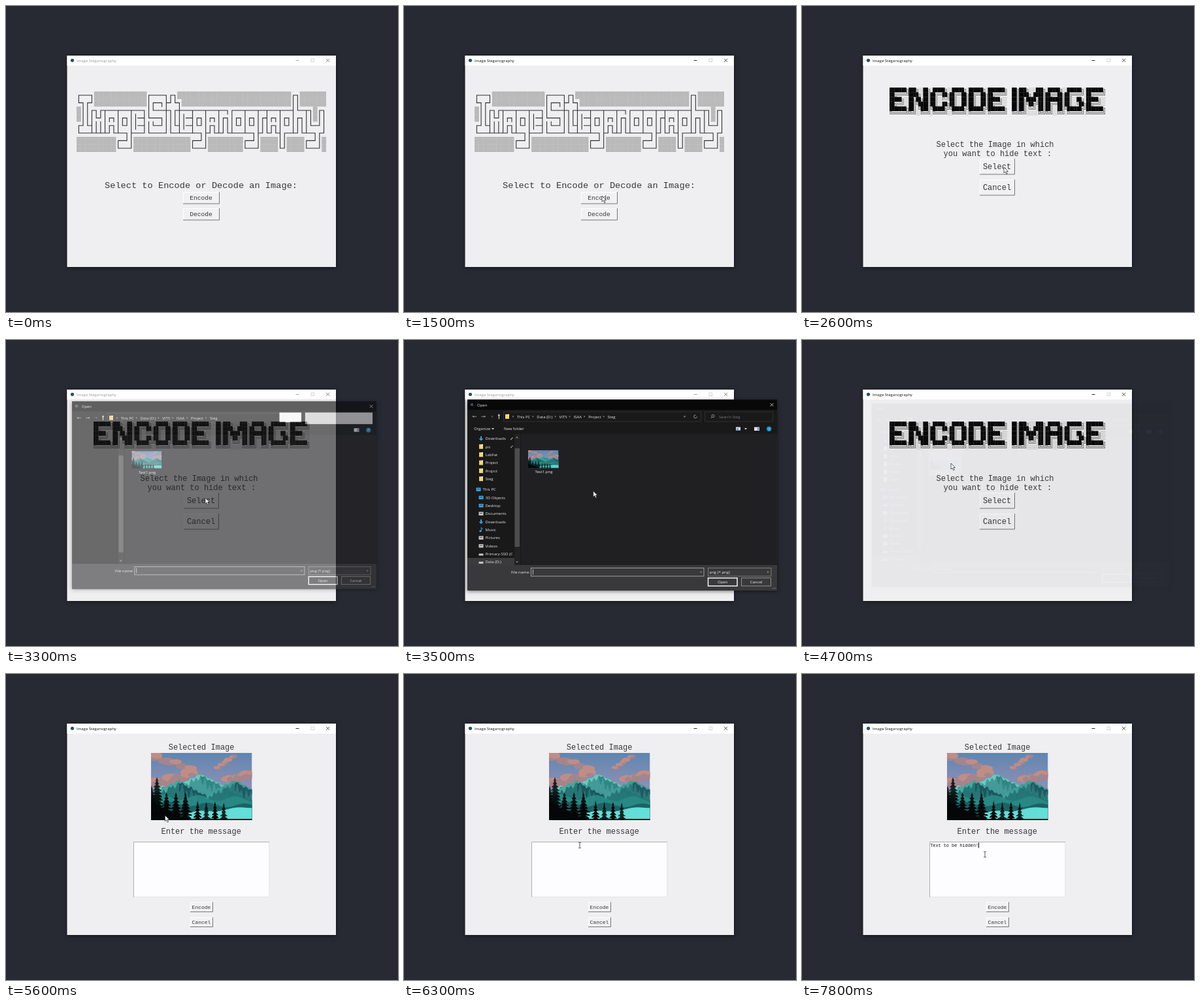
An HTML page with a canvas that plays this animation: 600 by 469 pixels, repeating every 8000 ms.

```html
<!DOCTYPE html>
<html lang="en">
<head>
<meta charset="utf-8">
<title>Image Steganography</title>
<style>
html, body { margin: 0; width: 100%; height: 100%; overflow: hidden; background: #282a33; }
canvas { display: block; width: 600px; height: 469px; }
</style>
</head>
<body>
<canvas id="stage"></canvas>
<script>
const W = 600, H = 469, LOOP = 8000, STEP = 100;
const MONO = '"Liberation Mono", "Courier New", monospace';
const SANS = '"Open Sans", "Noto Sans", sans-serif';
const PAPER = '#efeef0', INK = '#383838';
const canvas = document.getElementById('stage');
const dpr = window.devicePixelRatio || 1;
canvas.width = W * dpr;
canvas.height = H * dpr;
const c = canvas.getContext('2d');

// ---- helpers ----
const clamp = v => Math.max(0, Math.min(1, v));
const ease = k => k * k * (3 - 2 * k);
const rnd = i => Math.abs(Math.sin(i * 127.1 + 11.7) * 43758.5) % 1;

function rect(x, y, w, h, color) {
  c.fillStyle = color;
  c.fillRect(x, y, w, h);
}

function frame(x, y, w, h, color, weight = 0.8) {
  c.strokeStyle = color;
  c.lineWidth = weight;
  c.strokeRect(x, y, w, h);
}

function dot(x, y, r, color, ry = r) {
  c.fillStyle = color;
  c.beginPath();
  c.ellipse(x, y, r, ry, 0, 0, 7);
  c.fill();
}

function trace(pts) {
  c.beginPath();
  for (let i = 0; i < pts.length; i += 2) c.lineTo(pts[i], pts[i + 1]);
}

function poly(color, ...pts) {
  trace(pts);
  c.fillStyle = color;
  c.fill();
}

function line(color, weight, ...pts) {
  trace(pts);
  c.strokeStyle = color;
  c.lineWidth = weight;
  c.stroke();
}

function text(str, x, y, size, color = INK, family = MONO, align = 'left') {
  c.font = size + 'px ' + family;
  c.fillStyle = color;
  c.textAlign = align;
  c.fillText(str, x, y);
}

const label = (str, x, y, color = '#e8e8e8', align) => text(str, x, y, 6, color, SANS, align);

function chevron(x, y, dx, dy, color = '#aaa') {
  line(color, 0.8, x - dx - dy, y - dy - dx, x + dx, y + dy, x - dx + dy, y - dy + dx);
}

function cross(x, y, r, color) {
  line(color, 0.8, x - r, y - r, x + r, y + r);
  line(color, 0.8, x + r, y - r, x - r, y + r);
}

// ---- character banners ----
// Digits stand for runs of shade cells.
const unpack = rows => rows.map(r => r.replace(/\d+/g, n => '░'.repeat(n)));

const HOME = unpack([
  '┏━━┓12┏━━━┓┏┓26┏┓6',
  '┗┓┏┛12┃┏━┓┣┛┗┓25┃┃6',
  '1┃┃┏┓┏┳━━┳━━┳━━┓┃┗━━╋┓┏╋━━┳━━┳━━┳━┓┏━━┳━━┳━┳━━┳━━┫┗━┳┓1┏┓',
  '1┃┃┃┗┛┃┏┓┃┏┓┃┃━┫┗━━┓┃┃┃┃┃━┫┏┓┃┏┓┃┏┓┃┏┓┃┏┓┃┏┫┏┓┃┏┓┃┏┓┃┃1┃┃',
  '┏┛┗┫┃┃┃┏┓┃┗┛┃┃━┫┃┗━┛┃┃┗┫┃━┫┗┛┃┏┓┃┃┃┃┗┛┃┗┛┃┃┃┏┓┃┗┛┃┃┃┃┗━┛┃',
  '┗━━┻┻┻┻┛┗┻━┓┣━━┛┗━━━┛┗━┻━━┻━┓┣┛┗┻┛┗┻━━┻━┓┣┛┗┛┗┫┏━┻┛┗┻━┓┏┛',
  '9┏━┛┃13┏━┛┃8┏━┛┃4┃┃4┏━┛┃1',
  '9┗━━┛13┗━━┛8┗━━┛4┗┛4┗━━┛1'
]);

const ENCODE = unpack([
  '███████╗███╗2██╗1█████╗2█████╗1██████╗1███████╗  ██╗███╗3███╗1█████╗2██████╗1███████╗',
  '██╔════╝████╗1██║██╔══██╗██╔══██╗██╔══██╗██╔════╝  ██║████╗1████║██╔══██╗██╔════╝1██╔════╝',
  '█████╗2██╔██╗██║██║2╚═╝██║2██║██║2██║█████╗2  ██║██╔████╔██║███████║██║2██╗1█████╗2',
  '██╔══╝2██║╚████║██║2██╗██║2██║██║2██║██╔══╝2  ██║██║╚██╔╝██║██╔══██║██║2╚██╗██╔══╝2',
  '███████╗██║1╚███║╚█████╔╝╚█████╔╝██████╔╝███████╗  ██║██║1╚═╝1██║██║2██║╚██████╔╝███████╗',
  '╚══════╝╚═╝2╚══╝1╚════╝2╚════╝1╚═════╝1╚══════╝  ╚═╝╚═╝5╚═╝╚═╝2╚═╝1╚═════╝1╚══════╝'
]);

// A glyph has an arm towards each side whose list contains it.
const UP = '┃┗┛┣┫┻╋║╚╝', RIGHT = '━┏┗┣┳┻╋═╔╚', DOWN = '┃┏┓┣┫┳╋║╔╗', LEFT = '━┓┛┫┳┻╋═╗╝';

function eachCell(rows, x, y, cw, ch, fn) {
  rows.forEach((row, j) => [...row].forEach((g, i) => fn(g, x + i * cw, y + j * ch)));
}

function arms(rows, x, y, cw, ch, color, weight) {
  c.beginPath();
  eachCell(rows, x, y, cw, ch, (g, px, py) => {
    const mx = px + cw / 2, my = py + ch / 2;
    const arm = (side, ex, ey) => {
      if (side.includes(g)) { c.moveTo(mx, my); c.lineTo(ex, ey); }
    };
    arm(UP, mx, py);
    arm(RIGHT, px + cw, my);
    arm(DOWN, mx, py + ch);
    arm(LEFT, px, my);
  });
  c.strokeStyle = color;
  c.lineWidth = weight;
  c.lineCap = 'square';
  c.stroke();
  c.lineCap = 'butt';
}

function shade(rows, x, y, cw, ch, lines, color) {
  const pitch = ch / lines;
  eachCell(rows, x, y, cw, ch, (g, px, py) => {
    if (g !== '░') return;
    for (let k = 0; k < lines; k++) rect(px, py + k * pitch + 0.6, cw + 0.1, pitch * 0.4, color);
  });
}

function homeBanner() {
  const grid = [HOME, 108, 131, 6.7, 11.6];
  eachCell(...grid, (g, x, y) => { if (g === '░') rect(x, y, 6.8, 11.6, '#cacaca'); });
  shade(...grid, 5, '#a2a2a2');
  arms(...grid, '#333', 1.1);
}

function encodeBanner() {
  const grid = [ENCODE, 134, 125, 3.67, 7.2];
  shade(...grid, 3, '#c4c4c4');
  arms(...grid, '#4a4a4a', 2.7);
  arms(...grid, PAPER, 1.3);
  eachCell(...grid, (g, x, y) => { if (g === '█') rect(x, y, 3.87, 7.4, '#060606'); });
}

// ---- landscape, 154 x 102 units ----
function cloud(x0, y0, x1, y1, size) {
  for (let i = 0; i < 16; i++) {
    const k = i / 15, lift = rnd(i + x0), r = size * (0.5 + rnd(i + y1));
    const x = x0 + (x1 - x0) * k, y = y0 + (y1 - y0) * k + (lift - 0.5) * size;
    dot(x, y, r, lift < 0.45 ? '#c08d85' : '#a5858c', r * 0.5);
  }
}

// Each column follows the nearest peak, lit to the left and shaded to the right.
function mountains(body, lit, dark, ...peaks) {
  for (let x = 0; x < 154; x++) {
    const slopes = peaks.map(([px, py]) => py + 0.5 * Math.abs(x - px));
    const top = Math.min(...slopes), side = x - peaks[slopes.indexOf(top)][0];
    const y = top + 1.5 * Math.sin(x * 0.6) * rnd(x >> 2);
    rect(x, y, 1.3, 102 - y, body);
    const depth = 6 + 3 * Math.sin(x * 0.9) + 2 * Math.sin(x * 0.37);
    rect(x, y, 1.3, depth * (side < 0 ? 0.8 : 0.35), lit);
    if (side > 0) rect(x, y + depth * 0.35, 1.3, depth * 1.5, dark);
  }
}

function hill(color, from, y, slope, wave = 0) {
  for (let x = from; x < 154; x++) {
    const top = y + slope * (x - from) + wave * Math.sin(x * 0.11 + y);
    rect(x, top, 1.3, 102 - top, color);
  }
}

function tree(x, top, half) {
  for (let y = top; y < 101; y++) {
    const k = Math.min(1, (y - top + 2) / 32);
    const w = half * k * (0.45 + 0.55 * ((y - top) % 5) / 4) * (0.8 + 0.4 * rnd(x + y));
    rect(x - w, y, 2 * w, 1.2, '#050808');
  }
}

function paintScene() {
  const sky = c.createLinearGradient(0, 0, 0, 50);
  sky.addColorStop(0, '#5f86b0');
  sky.addColorStop(1, '#8c8fb5');
  rect(0, 0, 154, 102, sky);
  cloud(4, 4, 62, 24, 7);
  cloud(126, 4, 100, 24, 4);
  cloud(6, 44, 62, 33, 10);
  cloud(116, 42, 152, 31, 8);
  mountains('#3c9c95', '#78d2c6', '#2b827f', [75, 32], [16, 50], [104, 47]);
  mountains('#237374', '#4caea5', '#1a525c', [42, 42], [127, 42]);
  hill('#2a8b85', 0, 66, 0.03, 4);
  hill('#1b5e62', 0, 77, 0.02, 3);
  hill('#6deee6', 56, 91, -0.09, 1.5);
  hill('#050808', 0, 76, 0.45);
  hill('#050808', 0, 100, 0);
  for (let i = 0; i < 4; i++) {
    tree(9 + i * 14.5, i ? 60 : 37, 9);
    tree(71 + i * 13.3, 72 + rnd(i) * 4, 7);
  }
  tree(1, 50, 8);
}

function scene(x, y, w, h) {
  c.save();
  c.translate(x, y);
  c.scale(w / 154, h / 102);
  c.beginPath();
  c.rect(0, 0, 154, 102);
  c.clip();
  paintScene();
  c.restore();
}

// ---- app window ----
function panel(x, y, w, h, color) {
  c.save();
  c.shadowColor = 'rgba(0,0,0,.55)';
  c.shadowBlur = 6 * dpr;
  c.shadowOffsetY = dpr;
  rect(x, y, w, h, color);
  c.restore();
}

function appWindow(active) {
  const ink = active ? '#111' : '#999';
  panel(93.5, 76, 411.5, 324, PAPER);
  rect(93.5, 76, 411.5, 15.3, '#fff');
  dot(101.5, 83.3, 2.6, '#2d4f68');
  label('Image Steganography', 108, 85.6, ink);
  line(ink, 0.9, 443.5, 83.5, 448.5, 83.5);
  frame(467, 81, 4.6, 4.6, '#ccc');
  cross(492.5, 83.3, 2.6, active ? '#222' : '#666');
}

function button(str, x, y, w, h, size) {
  rect(x, y, w, h, '#f1f0f2');
  line('#fff', 1, x + 0.5, y + h, x + 0.5, y + 0.5, x + w, y + 0.5);
  line('#777', 1, x, y + h - 0.5, x + w - 0.5, y + h - 0.5, x + w - 0.5, y);
  text(str, x + w / 2 - 0.5, y + h / 2 + size * 0.32, size, INK, MONO, 'center');
}

function homeScreen() {
  homeBanner();
  text('Select to Encode or Decode an Image:', 151, 279.3, 13.67);
  button('Encode', 271, 285, 56, 18.5, 9.6);
  button('Decode', 271, 310, 56, 18.5, 9.6);
}

function encodeScreen() {
  encodeBanner();
  text('Select the Image in which', 205.5, 216, 12);
  text('you want to hide text :', 216.5, 230, 12);
  button('Select', 272, 234, 54, 24.5, 12);
  button('Cancel', 272, 266, 54, 24.5, 12);
}

function messageScreen(t) {
  text('Selected Image', 248.7, 115.5, 12);
  scene(222, 121, 154.5, 103);
  text('Enter the message', 237.5, 245, 12);
  rect(195, 257, 208, 85, '#fdfcfe');
  line('#a8a8a8', 0.9, 195.5, 342, 195.5, 257.5, 403, 257.5);
  line('#dcdcdc', 0.7, 196, 341.7, 402.7, 341.7, 402.7, 258);
  button('Encode', 282, 349.5, 35, 15.5, 8);
  button('Cancel', 282, 373, 35, 15, 8);
  if (t < 6400) return;
  const msg = 'Text to be hidden!', size = 6.85;
  const n = Math.floor(msg.length * clamp((t - 6500) / 1150));
  text(msg.slice(0, n), 196.2, 265, size, '#111');
  rect(196 + n * size * 0.6, 258.5, 1, 8, '#000');
}

// ---- file dialog ----
const FOLDER = '#f4d37a', BLUE = '#35a3dd', GREY = '#c8c8c8';
const CRUMBS = ['This PC', 'Data (D:)', 'VIT5', 'ISAA', 'Project', 'Steg'];
const PINNED = ['Downloads', 'pic', 'LabFat', 'Project', 'Projrct', 'Steg'];
const DRIVES = [
  'This PC', '3D Objects', 'Desktop', 'Documents', 'Downloads', 'Music', 'Pictures', 'Videos',
  'Primary-SSD (C', 'Data (D:)'
];

function icon(str, x, y) {
  if (str === 'Downloads') {
    rect(x - 1, y - 3.5, 2, 4, BLUE);
    poly(BLUE, x - 3.5, y, x + 3.5, y, x, y + 3.5);
  } else if (str === 'Music') {
    dot(x - 1, y + 2, 1.7, BLUE);
    line(BLUE, 1, x + 0.3, y + 2, x + 0.3, y - 3.5, x + 2.5, y - 1);
  } else if (/SSD|D:/.test(str)) {
    rect(x - 3.5, y - 0.5, 7, 3, GREY);
  } else if (DRIVES.includes(str)) {
    rect(x - 3.5, y - 2.7, 7, 5.4, /PC|3D|Desk/.test(str) ? BLUE : GREY);
    rect(x - 2, y - 1, 4, 1, '#445');
  } else {
    rect(x - 3, y - 3.5, 6, 7, FOLDER);
    rect(x + 1, y - 3.5, 2, 2, '#fff0b8');
  }
}

function sidebar() {
  rect(97, 334, 72, 11, '#3b3b3b');
  [...PINNED, ...DRIVES].forEach((str, i) => {
    const y = 151 + i * 12.35 + (i < PINNED.length ? 0 : 4);
    const x = str === 'This PC' ? 114 : 118;
    icon(str, x, y);
    label(str, x + 6.5, y + 2.2);
    if (i < 2) line('#aaa', 1.1, 163, y + 2, 166.5, y - 1.5);
  });
}

function addressBar() {
  for (const dir of [-1, 1]) {
    const x = 114.7 + dir * 6.7;
    line('#999', 0.9, x - 3, 117.3, x + 3, 117.3);
    chevron(x + 2 * dir, 117.3, 1.2 * dir, 0, '#999');
  }
  chevron(135, 117.3, 0, 1, '#777');
  line('#eee', 1, 145.3, 121, 145.3, 114.5);
  chevron(145.3, 115, 0, -1.3, '#eee');
  frame(152.5, 110, 302, 15, '#363636');
  icon('', 158, 117.3);
  let x = 173;
  for (const str of CRUMBS) {
    chevron(x - 6, 117.3, 0.8, 0);
    label(str, x, 119.5);
    x += c.measureText(str).width + 10;
  }
  chevron(429.5, 117.3, 0, 1.2);
  frame(460.5, 110, 104, 15, '#363636');
}

function toolbar() {
  c.strokeStyle = '#aaa';
  c.lineWidth = 0.8;
  c.beginPath();
  c.arc(446, 117.3, 2.4, 0, 5);
  c.moveTo(475, 116.5);
  c.arc(473, 116.5, 2, 0, 7);
  c.stroke();
  line('#aaa', 0.8, 471.5, 118, 469.5, 120);
  label('Search Steg', 482, 119.5, '#777');
  label('Organize', 107, 138.4);
  label('New folder', 153, 138.4);
  for (const x of [136, 523]) poly('#ddd', x - 2, 135, x + 2, 135, x, 137.5);
  rect(508, 133.5, 7, 5, '#d7e6f2');
  rect(509, 135.5, 3, 2, '#3c80ba');
}

function footer(picked) {
  label('File name:', 164, 358);
  frame(194.5, 349.5, 264.5, 12.5, '#b8b8b8');
  if (picked) label('Test1.png', 197, 358);
  else rect(197, 351.5, 0.8, 8, '#ddd');
  frame(465.5, 349.5, 96.5, 12.5, '#8a8a8a');
  label('png (*.png)', 467.5, 358);
  for (const x of [454.5, 557]) chevron(x, 355.7, 0, 1.1);
  frame(465.5, 364.8, 44.5, 12.2, '#fff', 1.4);
  label('Open', 487.7, 373.2, '#eee', 'center');
  frame(516.5, 364.8, 45, 12.2, '#a5a5a5');
  label('Cancel', 539, 373.2, '#eee', 'center');
  for (let i = 0; i < 3; i++) rect(568 - i * 2, 380, 1, 1, '#999');
}

function dialog(loading, closing, picked) {
  panel(97, 91.5, 474, 292.5, '#191919');
  rect(97, 91.5, 474, 15.5, '#080808');
  rect(179, 144, 392, 201, '#202022');
  rect(97, 345, 474, 39, '#39383b');
  if (!closing) {
    dot(104, 99, 2.3, '#2d4f68');
    cross(563, 99.3, 2.5, '#ddd');
  }
  label('Open', closing ? 102 : 112, 101.5);
  addressBar();
  if (loading) {
    rect(420, 109, 34, 15, '#fff');
    rect(460, 109, 105, 18, '#d4d4d4');
  } else {
    toolbar();
    sidebar();
  }
  rect(536, 133.5, 8, 5.5, '#e2e2e2');
  rect(541, 134.5, 2.3, 3.7, '#4a94cc');
  dot(558.7, 136.3, 3.7, '#1f8fd0');
  label('?', 558.7, 138.5, '#fff', 'center');
  rect(169, 144, 9, 201, '#222');
  rect(169.5, loading ? 176 : 166, 7.5, 151, '#4d4d4d');
  chevron(173, 149.5, 0, -1.1);
  chevron(173, 340, 0, 1.1);
  if (picked) rect(187.5, 148.5, 53, 58.5, '#777678');
  scene(190, 169, 46.5, 27.5);
  label('Test1.png', 214, 204.3, '#f0f0f0', 'center');
  footer(picked);
}

const backdrop = document.createElement('canvas');
backdrop.width = canvas.width;
backdrop.height = canvas.height;

// Fades as one layer, growing or shrinking with its opacity.
function dialogAt(t) {
  const opening = 0.62 + (t - 3300) / 250, closing = 1 - 0.955 * (t - 4500) / 200;
  const alpha = clamp(Math.min(opening, closing)), scale = 0.955 + 0.045 * alpha;
  if (t < 3300 || alpha === 0) return;
  const back = backdrop.getContext('2d');
  back.drawImage(canvas, 0, 0);
  c.save();
  c.translate(334, 237.5);
  c.scale(scale, scale);
  c.translate(-334, -237.5);
  dialog(t < 3400, t >= 4500, t >= 4200);
  c.restore();
  c.globalAlpha = 1 - alpha;
  c.drawImage(backdrop, 0, 0, W, H);
  c.globalAlpha = 1;
}

// ---- pointer ----
// Start time, end time and place reached.
const MOVES = [
  [100, 900, 472, 215], [1000, 1500, 303, 291], [1900, 2600, 309, 247], [2800, 3300, 305, 242],
  [3300, 4000, 228, 189], [5100, 6300, 269, 262.5], [6900, 7700, 280, 276.5]
];

function pointer(t) {
  if (t < 100) return;
  let x = 22, y = 388;
  for (const [from, to, tx, ty] of MOVES) {
    const k = ease(clamp((t - from) / (to - from)));
    x += (tx - x) * k;
    y += (ty - y) * k;
  }
  if (t >= 5100 && y > 257) {
    line('#444', 0.9, x, y - 4, x, y + 4);
    for (const end of [-4.2, 4.2]) line('#444', 0.8, x - 2, y + end, x + 2, y + end);
    return;
  }
  poly('#fff', x, y, x, y + 9, x + 2, y + 7, x + 3.7, y + 10.6, x + 5.2, y + 10, x + 3.7, y + 6.5, x + 6.5, y + 6.5);
  c.closePath();
  c.strokeStyle = '#222';
  c.lineWidth = 0.7;
  c.stroke();
}

// ---- timeline ----
function draw(t) {
  c.setTransform(dpr, 0, 0, dpr, 0, 0);
  rect(0, 0, W, H, '#282a33');
  appWindow((t >= 400 && t < 2900) || t >= 4500);
  if (t < 1900) homeScreen();
  else if (t < 5100) encodeScreen();
  else messageScreen(t);
  dialogAt(t);
  pointer(t);
}

const start = performance.now();
let shown = -1;
function tick() {
  const t = Math.floor(((performance.now() - start) % LOOP) / STEP) * STEP;
  if (t !== shown) draw(shown = t);
  requestAnimationFrame(tick);
}
tick();
</script>
</body>
</html>
```
